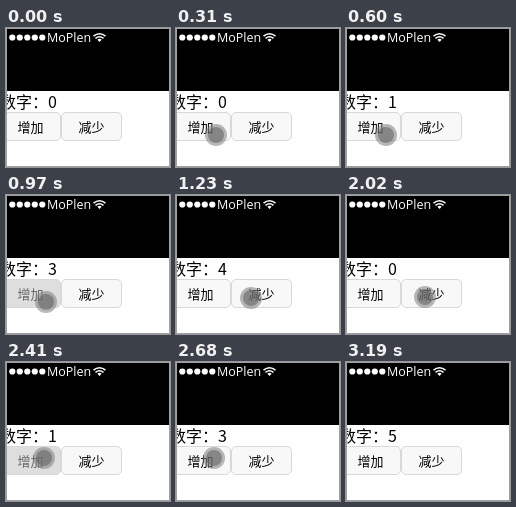
Write an HTML page that moves like this. It is 164 px wide and 139 px high and loops after 3550 ms.

```html
<!DOCTYPE html>
<html lang="zh">
<head>
<meta charset="utf-8">
<style>
  html, body { margin: 0; width: 100%; height: 100%; overflow: hidden; background: #fff; }
  svg { display: block; width: 164px; height: 139px; }
  text { font-family: "Noto Sans CJK SC", "Noto Sans CJK", "Noto Sans", sans-serif; }
  .status { font: 12.5px "Open Sans", "Noto Sans", sans-serif; fill: #fff; }
  .button rect { fill: #f8f8f8; stroke: #d8d8d8; }
  .button text { font-size: 13px; text-anchor: middle; }
  .button.active rect { fill: #dedede; }
  .button.active text { fill: #666; }
</style>
</head>
<body>
<svg viewBox="0 0 164 139">
  <rect width="164" height="139" fill="#fff"/>
  <rect width="164" height="63"/>
  <g id="dots" fill="#fff"></g>
  <text class="status" x="41" y="13.5" textLength="">MoPlen</text>
  <g fill="none" stroke="#fff" stroke-width="1.5">
    <path d="M87.5 8.2Q93.5 3.2 99.5 8.2M89.5 10.4Q93.5 7 97.5 10.4"/>
    <path d="M91.4 11.7Q93.5 10 95.6 11.7L93.5 14Z" fill="#fff" stroke="none"/>
  </g>
  <text x="-6" y="80" font-size="16">数字：</text>
  <text id="count" x="42" y="80" font-size="16">0</text>
  <g id="add" class="button">
    <rect x="-5.5" y="84.5" width="60" height="28" rx="4.5"/>
    <text x="24.5" y="103.5">增加</text>
  </g>
  <g id="subtract" class="button">
    <rect x="55.5" y="84.5" width="60" height="28" rx="4.5"/>
    <text x="85.5" y="103.5">减少</text>
  </g>
  <g id="cursor">
    <circle id="halo" r="11"/>
    <circle id="core" r="8"/>
  </g>
  <rect x=".5" y=".5" width="163" height="138" fill="none" stroke="#a0a0a0"/>
</svg>
<script>
const LOOP = 3550, STEP = 50;
const byId = id => document.getElementById(id);
const [count, add, subtract, cursor, halo, core] =
  ["count", "add", "subtract", "cursor", "halo", "core"].map(byId);

byId("dots").innerHTML = Array.from({ length: 5 }, (_, i) =>
  `<circle cx="${6.3 + i * 7.5}" cy="9.5" r="3.1"/>`).join("");

// Cursor stops: time, x, y
const path = [
  [130, 84, 131], [310, 40, 107], [1130, 40, 107], [1230, 75, 103],
  [1330, 79, 102], [2020, 79, 102], [2220, 38, 96], [3010, 38, 96], [3190, 160, 150]
];
// Clicks: time, duration, change of the counter
const clicks = [
  [460, 140, 1], [750, 100, 1], [900, 100, 1], [1050, 100, 1],
  [1380, 120, -1], [1610, 150, -1], [1810, 100, -1], [1920, 100, -1],
  [2350, 100, 1], [2470, 100, 1], [2580, 100, 1], [2760, 100, 1], [2960, 100, 1]
];

function cursorAt(time) {
  const next = path.findIndex(stop => stop[0] > time);
  if (next < 1) return null;
  const [t0, x0, y0] = path[next - 1], [t1, x1, y1] = path[next];
  const stepped = Math.floor((time - t0) / STEP) * STEP;
  const k = stepped / (t1 - t0);
  return [x0 + (x1 - x0) * k, y0 + (y1 - y0) * k];
}

function render(time) {
  let value = 0, pressed = false, active = 0;
  for (const [start, length, change] of clicks) {
    const age = time - start;
    if (age >= length / 2) value += change;
    if (age >= 0 && age < length / 2) pressed = true;
    if (age >= length / 2 && age < length) active = change;
  }
  count.textContent = value;
  add.classList.toggle("active", active > 0);
  subtract.classList.toggle("active", active < 0);

  const position = cursorAt(time);
  cursor.style.display = position ? "" : "none";
  if (position) cursor.setAttribute("transform", `translate(${position})`);
  halo.setAttribute("fill", pressed ? "rgba(205,200,20,.8)" : "rgba(125,125,125,.55)");
  core.setAttribute("fill", pressed ? "rgba(190,185,20,.4)" : "rgba(95,95,95,.55)");
}

const began = performance.now();
function tick() {
  render((performance.now() - began) % LOOP);
  requestAnimationFrame(tick);
}
tick();
</script>
</body>
</html>
```
